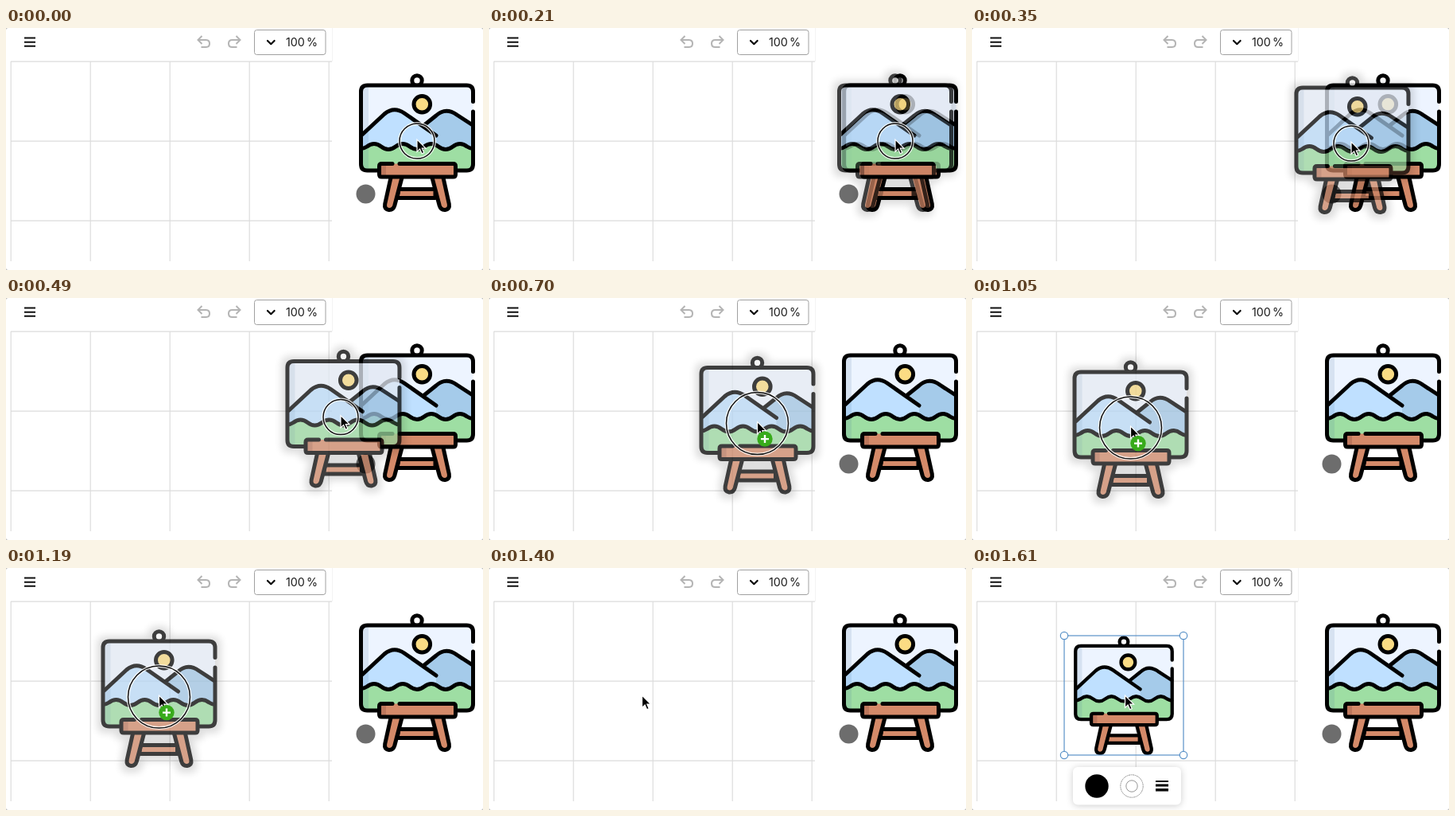
An HTML page that plays this animation: 600 by 304 pixels, repeating every 1.89 s.

```html
<!DOCTYPE html>
<html lang="en">
<head>
<meta charset="utf-8">
<title>Drag onto canvas</title>
<style>
  html, body { margin: 0; width: 100%; height: 100%; overflow: hidden; background: #fff; }
  svg { display: block; width: 100vw; height: 100vh; }
  .bold { stroke: #000; stroke-width: 5; stroke-linecap: round; stroke-linejoin: round; }
  .open { fill: none; }
  .wood { fill: #d48a69; }
  .shade { fill: #4a6f9a; opacity: .14; }
  .ghost-shadow { filter: url(#spread); opacity: .13; }
  .ghost-icon { opacity: .72; }
  .toolbar-box { filter: drop-shadow(0 1px 4px rgba(0, 0, 0, .2)); }
  text { font: 14.3px Inter, "Open Sans", sans-serif; fill: #1c1c1c; }
</style>
</head>
<body>
<svg viewBox="0 0 600 304">
  <defs>
    <filter id="spread" x="-20%" y="-20%" width="140%" height="140%">
      <feMorphology in="SourceAlpha" operator="dilate" radius="5"/>
      <feGaussianBlur stdDeviation="5"/>
    </filter>
    <path id="leg" class="bold wood" d="M484 188L476.7 221Q475.6 227.5 481.5 228.5Q487 229 488.8 223L498 188"/>
    <clipPath id="board"><rect x="446.5" y="72" width="141" height="107" rx="8"/></clipPath>
    <g id="easel">
      <circle class="bold" cx="517" cy="66" r="6.2" fill="#fff"/>
      <g clip-path="url(#board)">
        <path fill="#edf4ff" d="M446 72h142v108h-142z"/>
        <path fill="#a5cbea" d="M520 128L541 110Q553 99 567 109L588 122V155H520z"/>
        <path fill="#bfe0ff" d="M446 136L476 108Q488 98 501 107L541 135V155H446z"/>
        <path fill="#9edea3" d="M447 150.500L454 149Q463 142 472 149T490 149T508 149T526 149T544 149T562 149T580 149L588 151V180H446z"/>
        <path class="shade" d="M446 72h10v108h-10z"/>
      </g>
      <path class="bold open" d="M526 122L541 110Q553 99 567 109L587 122M448 134L476 108Q488 98 501 107L541 135"/>
      <path class="bold open" d="M447 151.500Q450 151.500 454 149Q463 142 472 149T490 149T508 149T526 149T544 149T562 149T580 149Q584 151.500 587 151.500"/>
      <circle class="bold" cx="523.3" cy="95.7" r="10.3" fill="#fbdc84"/>
      <path class="bold open" d="M587.5 92.5V80Q587.5 72 579.5 72H454.5Q446.5 72 446.5 80V171Q446.5 179 454.5 179H579.5Q587.5 179 587.5 171V105"/>
      <path class="bold wood" d="M494 202.5H540V213.5H492z"/>
      <use href="#leg"/>
      <use href="#leg" transform="matrix(-1 0 0 1 1034 0)"/>
      <rect class="wood" x="469.5" y="170.5" width="96" height="16.5" rx="3"/>
      <path fill="#bd775c" d="M470 171h8v16h-8z"/>
      <path class="bold open" d="M495 170.5H562.5Q565.5 170.5 565.5 173.5V184Q565.5 187 562.5 187H472.5Q469.5 187 469.5 184V173.5Q469.5 170.5 472.5 170.5H486"/>
    </g>
    <path id="undo" fill="none" stroke="#b4b4b4" stroke-width="2" d="M246.500 10L241.500 15L246.500 20M242 15H251.500Q256 15 256 19.500T251.500 24H245.500"/>
  </defs>

  <rect width="600" height="304" fill="#b5b5b5"/>
  <rect width="600" height="304" rx="3" fill="#fff"/>
  <path stroke="#f3f3f3" d="M410.5 0V42"/>
  <path stroke="#dcdcdc" stroke-width="1.2" d="M6.200 42V293M106.200 42V293M206.200 42V293M306.200 42V293M406.200 42V293M6 42.100H410M6 142.100H410M6 242.100H410"/>

  <path stroke="#111" stroke-width="2" d="M23 12.600H37M23 17.700H37M23 22.800H37"/>
  <use href="#undo"/>
  <use href="#undo" transform="matrix(-1 0 0 1 536 0)"/>
  <rect x="312.5" y="2.5" width="89.5" height="31" rx="3" fill="#fff" stroke="#a0a0a0"/>
  <path fill="none" stroke="#000" stroke-width="2.2" stroke-linecap="round" stroke-linejoin="round" d="M329 16L333.3 20.2L337.6 16"/>
  <text y="22.8"><tspan x="352">100</tspan><tspan x="378">%</tspan></text>

  <use href="#easel"/>
  <circle cx="452.5" cy="208.5" r="12" fill="#6d6d6d"/>

  <g id="placed">
    <use href="#easel" transform="translate(-254.7 35.9) scale(.862)"/>
    <g fill="#fff" stroke="#5a92c8" stroke-width="1.2">
      <rect x="116" y="85" width="150" height="150" fill="none"/>
      <circle cx="116" cy="85" r="4.7"/>
      <circle cx="266" cy="85" r="4.7"/>
      <circle cx="116" cy="235" r="4.7"/>
      <circle cx="266" cy="235" r="4.7"/>
    </g>
  </g>
  <g id="toolbar">
    <rect class="toolbar-box" x="127" y="250" width="136" height="47.5" rx="6" fill="#fff"/>
    <circle cx="157" cy="274" r="14.7"/>
    <g fill="none" stroke="#8a8a8a" stroke-width=".9">
      <circle cx="201" cy="274" r="14.2" stroke-dasharray="2 .6"/>
      <circle cx="201" cy="274" r="7.2"/>
    </g>
    <path d="M231 267h16v2h-16zM231 271.5h16v3h-16zM231 277h16v3.5h-16z"/>
  </g>

  <g id="ghost">
    <g class="ghost-shadow"><use href="#easel" y="1"/></g>
    <g class="ghost-icon"><use href="#easel"/></g>
  </g>

  <g id="pointer">
    <g id="halo" fill="none">
      <circle cy="2" stroke="#fff" stroke-width="4" stroke-opacity=".8"/>
      <circle cy="2" stroke="#111" stroke-width="1.5"/>
    </g>
    <path stroke="#fff" stroke-width="1.2" d="M0 0V15.3L3.6 12L6.1 17.6L8.700 16.5L6.3 11H11z"/>
    <g id="badge" transform="translate(9.5 21.5)">
      <circle r="9.7" fill="#38ab1b"/>
      <path stroke="#fff" stroke-width="2.4" d="M-5 0H5M0 -5V5"/>
    </g>
  </g>
</svg>
<script>
  const STEP = 70, LOOP = 1890;
  // Pointer offset from its start, one pair per step until the drop.
  const path = [
    [0, 0], [-1, 0], [-3, 0], [-6, 0], [-19, 1], [-40, 3], [-67, 5], [-96, 7.5], [-123, 10.5],
    [-151, 13], [-179.5, 15.5], [-211, 18], [-243, 20], [-272, 21], [-298, 21], [-317.5, 21],
    [-323, 20.5], [-324.5, 20]
  ];
  const DRAG = 2, OVER_CANVAS = 8, DROP = 20, PLACED = 21, TOOLBAR = 22;

  const el = id => document.getElementById(id);
  const show = (id, opacity) => { el(id).style.opacity = Number(opacity); };
  const move = (id, x, y) => el(id).setAttribute("transform", `translate(${x} ${y})`);
  const rings = el("halo").querySelectorAll("circle");

  function draw(now) {
    const step = Math.floor((now % LOOP) / STEP);
    const [x, y] = path[Math.min(step, path.length - 1)];
    const lag = step > 3 && step < 9 ? x * .036 : 0;
    const radius = step < OVER_CANVAS ? 22 : step === OVER_CANVAS ? 31 : 39;

    move("ghost", x - lag, y);
    move("pointer", 517 + x, 140.1 + y);
    rings.forEach(ring => ring.setAttribute("r", radius));

    show("ghost", step >= DRAG && step < DROP);
    show("halo", step < DROP);
    show("badge", step >= OVER_CANVAS && step < DROP);
    show("placed", step >= PLACED);
    show("toolbar", step < TOOLBAR ? 0 : step === TOOLBAR ? .5 : 1);
  }

  function tick() {
    draw(performance.now());
    requestAnimationFrame(tick);
  }
  tick();
</script>
</body>
</html>
```
